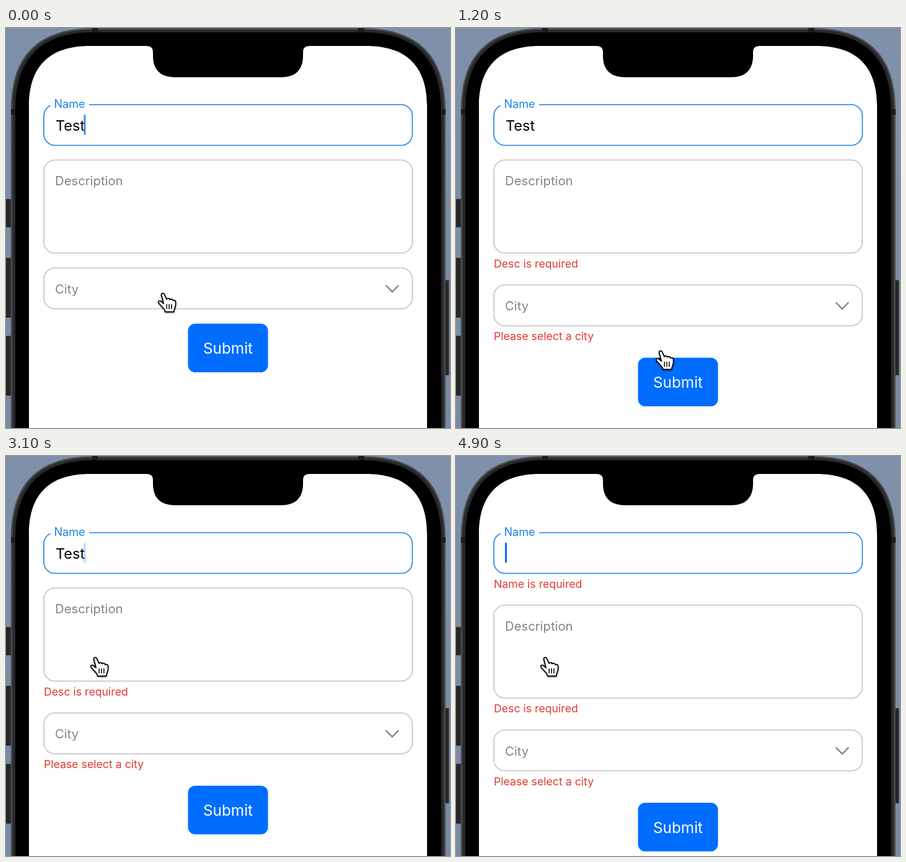
Write an HTML page that moves like this. It is 716 px wide and 646 px high and loops after 5 s.

```html
<!DOCTYPE html>
<html lang="en">
<head>
<meta charset="utf-8">
<title>Form validation</title>
<style>
  html, body { margin: 0; width: 100%; height: 100%; overflow: hidden; background: #7b8ca4; }
  svg { display: block; width: 716px; height: 646px; font-family: Inter, "Liberation Sans", sans-serif; }
  .box { fill: #fff; stroke: #c1c1c1; stroke-width: 1.6; }
  .label { fill: #858585; font-size: 20.3px; }
  .error { fill: #e03a32; font-size: 17.7px; }
  #hand { filter: drop-shadow(0 1.5px 1.5px rgba(0, 0, 0, .4)); }
</style>
</head>
<body>
<svg viewBox="0 0 716 646">
  <defs>
    <linearGradient id="bg" x2="0" y2="1">
      <stop stop-color="#7f91aa"/><stop offset="1" stop-color="#788aa2"/>
    </linearGradient>
  </defs>
  <rect width="716" height="646" fill="url(#bg)"/>

  <!-- phone -->
  <g fill="#272727" stroke="#3d3d3d">
    <path d="M-3 276.500H8V321.500H-3ZM-3 371.500H8V467.500H-3ZM-3 497.500H8V593.500H-3ZM707 407.500H714V560.500H707Z"/>
  </g>
  <path d="M9 660V132C9 45 53 1.500 140 1.500H576C663 1.500 707.500 45 707.500 132V660Z" fill="#28292a" stroke="#4a4b4c" stroke-width="2.500"/>
  <path d="M139 0H148V7H139ZM568 0H578V7H568ZM8 131H15V140H8ZM702 131H709V140H702Z" fill="#1c1c1d"/>
  <path d="M15 660V132C15 49 57 7 140 7H576C659 7 701.500 49 701.500 132V660Z"/>
  <path d="M37 646V126C37 62 70 29 135 29H227Q237 29 237 39V45C237 68 250 79.500 272 79.500H444C466 79.500 479 68 479 45V39Q479 29 489 29H581C646 29 679 62 679 126V646Z" fill="#fff"/>

  <!-- name -->
  <rect class="box" x="61" y="123.700" width="594.300" height="65.800" rx="18" style="stroke:#1c80e6"/>
  <path d="M72 120H134V129H72Z" fill="#fff"/>
  <text x="77.500" y="129.300" font-size="18" fill="#1c80e6">Name</text>
  <text id="value" x="80" y="166" font-size="23.500"></text>
  <rect id="caret" y="140" width="3" height="32.500" rx="1" fill="#086cf0"/>
  <text id="nameError" class="error" x="61" y="212.700">Name is required</text>

  <!-- description -->
  <g id="desc">
    <rect class="box" x="61" y="213.200" width="594.300" height="150.300" rx="18"/>
    <text class="label" x="79" y="254.300">Description</text>
    <text class="error late" x="61" y="386.700">Desc is required</text>
  </g>

  <!-- city -->
  <g id="city">
    <rect class="box" x="61" y="387.500" width="594.300" height="66" rx="18"/>
    <text class="label" x="79" y="428.500">City</text>
    <path d="M612.500 415.500L622.800 426L633.200 415.500" fill="none" stroke="#828282" stroke-width="2.300"/>
    <text class="error late" x="61" y="476.500">Please select a city</text>
  </g>

  <!-- submit -->
  <g id="submit">
    <rect x="293.500" y="477.500" width="129" height="78.500" rx="11.500" fill="#006dff"/>
    <text id="caption" x="358" y="526" font-size="24.300" text-anchor="middle" fill="#fff">Submit</text>
  </g>

  <g id="hand" stroke="#000" stroke-linejoin="round" stroke-linecap="round">
    <path d="M5.800 5C4.500 1.300 9 .2 10.500 3.300L14 11C15 8.800 18.300 9.300 19 11.700C20.500 10 23.500 10.500 24 13C26 11.900 28.400 13 28.600 15.600C29 19 28.700 21 27.700 24C27 26.500 25.800 28.500 25.700 31.500H12C11.500 28.500 10 26.500 7.500 24.200C5 21.900 3.500 20 1.600 17.500C-.6 14.300 3 12.400 5.300 14.800L9.200 18Z" fill="#fff" stroke-width="1.800"/>
    <path d="M14.200 19.500V26.500M18 19.500V26.500M21.900 19.500V26.500" fill="none" stroke-width="1.500"/>
  </g>
</svg>

<script>
const LOOP = 5000, STEP = 100, ROW = 27.5;
const $ = id => document.getElementById(id);
const clamp = v => Math.max(0, Math.min(1, v));
const ramp = (t, a, b) => clamp((t - a) / (b - a));
const smooth = p => p * p * (3 - 2 * p);
const move = (id, x, y) => $(id).setAttribute('transform', `translate(${x} ${y})`);

const carets = [79, 93.2, 106, 118, 125.5];   // caret x by typed length
const path = [                                // start, end, from, to
  [0, 600, [245, 427], [322, 520]],
  [1250, 1900, [322, 520], [135, 328]],
  [2400, 2700, [135, 328], [136, 324]]
];

function hand(t) {
  const [a, b, from, to] = path.filter(p => t >= p[0]).pop();
  const p = smooth(ramp(t, a, b));
  return from.map((v, i) => v + (to[i] - v) * p);
}

function blink(t) {
  if (t >= 4000) return 1;
  const p = (t + 50) % 1000;
  return p < 500 ? 1 - ramp(p, 0, 210) : ramp(p, 500, 720);
}

function draw(t) {
  const invalid = t >= 1000;
  const letters = 4 - (t < 4100 ? 0 : Math.min(4, 1 + Math.floor((t - 4100) / 200)));
  const top = letters ? 0 : ROW;
  const gap = invalid ? ROW : 0;

  $('value').textContent = 'Test'.slice(0, letters);
  $('caret').setAttribute('x', carets[letters]);
  $('caret').setAttribute('opacity', blink(t));
  $('nameError').setAttribute('opacity', letters ? 0 : 1);
  document.querySelectorAll('.late').forEach(e => e.setAttribute('opacity', invalid ? 1 : 0));

  move('desc', 0, top);
  move('city', 0, top + gap);
  move('submit', 0, top + 2 * gap);
  $('caption').setAttribute('opacity', 1 - .86 * (ramp(t, 600, 780) - smooth(ramp(t, 930, 1250))));
  move('hand', ...hand(t));
}

const start = performance.now();
function frame() {
  const t = (performance.now() - start) % LOOP;
  draw(Math.floor(t / STEP) * STEP);
  requestAnimationFrame(frame);
}
frame();
</script>
</body>
</html>
```
